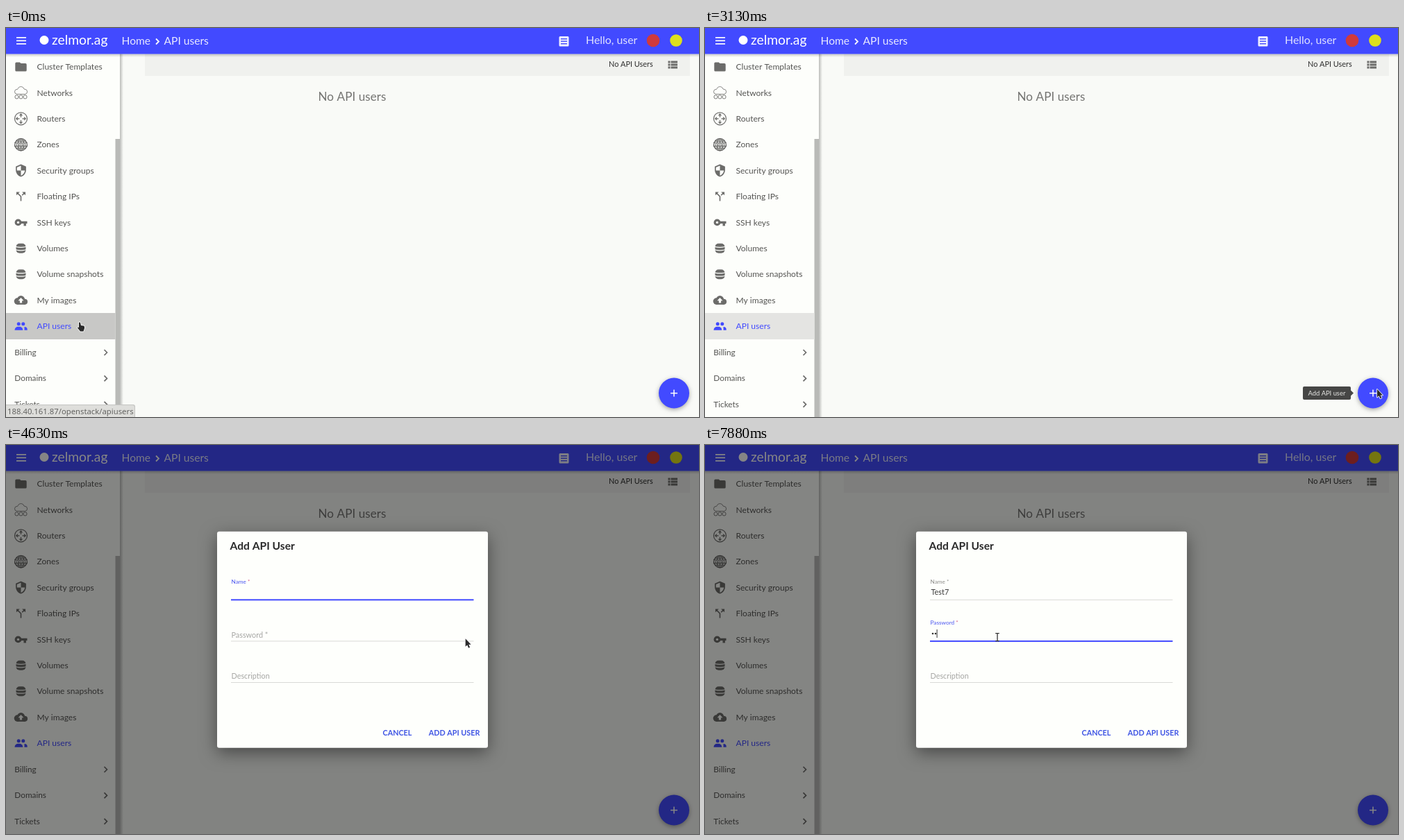
These frames come from a looping animation (998x561 px, 8000 ms). An HTML page with a canvas:

```html
<!DOCTYPE html>
<html lang="en">
<head>
<meta charset="utf-8">
<title>Add API user</title>
<style>
html, body { margin: 0; width: 100%; height: 100%; overflow: hidden; background: #f9faf7; }
canvas { display: block; width: 998px; height: 561px; }
</style>
</head>
<body>
<canvas id="stage" width="998" height="561"></canvas>
<script>
const ctx = document.getElementById('stage').getContext('2d');
const LOOP = 8000, STEP = 125;
const BLUE = '#424aff', PRESSED = '#4047da', ICON = '#6c6c6a', PAPER = '#fdfefb';
const DIALOG_OPEN = 26, FOCUS_NAME = 29, POINTER_LEAVES = 32, FOCUS_PASSWORD = 53;

// ---- helpers ----
function text(str, x, y, size, color, weight = 400, family = 'Lato, sans-serif') {
  ctx.font = `${weight} ${size}px ${family}`;
  ctx.fillStyle = color;
  ctx.fillText(str, x, y);
  return ctx.measureText(str).width;
}
function rect(x, y, w, h, color) {
  ctx.fillStyle = color;
  ctx.fillRect(x, y, w, h);
}
function panel(x, y, w, h, r, color) {
  ctx.fillStyle = color;
  ctx.beginPath();
  ctx.roundRect(x, y, w, h, r);
  ctx.fill();
}
function disc(x, y, r, color) {
  ctx.fillStyle = color;
  ctx.beginPath();
  ctx.arc(x, y, r, 0, 7);
  ctx.fill();
}
function ring(x, y, rx, ry, color, width) {
  ctx.strokeStyle = color;
  ctx.lineWidth = width;
  ctx.beginPath();
  ctx.ellipse(x, y, rx, ry, 0, 0, 7);
  ctx.stroke();
}
function line(points, color, width) {
  ctx.strokeStyle = color;
  ctx.lineWidth = width;
  ctx.beginPath();
  points.forEach(([x, y]) => ctx.lineTo(x, y));
  ctx.stroke();
}
function shadow(color, blur, dy) {
  ctx.shadowColor = color;
  ctx.shadowBlur = blur;
  ctx.shadowOffsetY = dy;
}
function fade(x0, y0, x1, y1, x, y, w, h, alpha) {
  const g = ctx.createLinearGradient(x0, y0, x1, y1);
  g.addColorStop(0, `rgba(0,0,0,${alpha})`);
  g.addColorStop(1, 'rgba(0,0,0,0)');
  rect(x, y, w, h, g);
}
const mix = (a, b, p) => a + (b - a) * p;

// ---- sidebar icons, drawn around 0,0 ----
function glyph(d) {
  const path = new Path2D(d);
  return () => {
    ctx.scale(.82, .82);
    ctx.translate(-12, -12);
    ctx.fillStyle = ICON;
    ctx.fill(path, 'evenodd');
  };
}
const folder = glyph('M10 4H4Q2 4 2 6V18Q2 20 4 20H20Q22 20 22 18V8Q22 6 20 6H12Z');
const shield = glyph('M12 1L3 5V11C3 16.5 6.8 21.7 12 23C17.2 21.7 21 16.5 21 11V5ZM12 12H19C18.5 16 15.7 19.8 12 21V12H5V6.3L12 3.2Z');
const split = glyph('M14 4L16.3 6.3 13.4 9.2 14.8 10.6 17.7 7.7 20 10V4ZM10 4H4V10L6.3 7.7 11 12.4V20H13V11.6L7.7 6.3Z');

function network() {
  ctx.beginPath();
  ctx.arc(-5.5, -1.5, 3.5, 1.6, 4.9);
  ctx.arc(0, -4, 4.8, 3.5, 6);
  ctx.arc(5.5, -1.5, 3.6, 4.7, 7.8);
  ctx.closePath();
  ctx.strokeStyle = '#888886';
  ctx.lineWidth = 1;
  ctx.stroke();
  line([[-6, 6], [6, 6]], '#888886', 1);
  for (const x of [-6, 0, 6]) {
    disc(x, 6, 2.8, PAPER);
    ring(x, 6, 2.6, 2.6, '#777775', 1);
  }
}
function router() {
  ring(0, 0, 9, 9, ICON, 1.2);
  for (let i = 0; i < 4; i++) {
    line([[0, -2], [0, -6.5]], ICON, 1.3);
    line([[-2, -4.5], [0, -6.8], [2, -4.5]], ICON, 1.2);
    ctx.rotate(Math.PI / 2);
  }
}
function globe() {
  ring(0, 0, 8.6, 8.6, ICON, 1.5);
  ring(0, 0, 4.3, 8.6, ICON, 1.3);
  line([[0, -8], [0, 8]], ICON, 1.3);
  line([[-7, -5], [7, -5]], ICON, 1.3);
  line([[-7, 5], [7, 5]], ICON, 1.3);
  rect(-9.5, -3, 19, 6, ICON);
  ctx.textAlign = 'center';
  text('www', 0, 2, 7.5, PAPER, 700);
}
function key() {
  rect(-1, -1.7, 10, 3.4, ICON);
  rect(4, 0, 3.4, 5, ICON);
  disc(-4, 0, 4.9, ICON);
  disc(-4, 0, 1.7, PAPER);
}
function disks() {
  panel(-7, -7, 14, 14, 5, ICON);
  for (const y of [-3.5, 1]) {
    ctx.strokeStyle = PAPER;
    ctx.lineWidth = 1.2;
    ctx.beginPath();
    ctx.ellipse(0, y, 8, 2, 0, 0, Math.PI);
    ctx.stroke();
  }
}
function cloud() {
  disc(-5, 1.5, 4.8, ICON);
  disc(0, -1, 5.6, ICON);
  disc(5.5, 2.2, 4.1, ICON);
  rect(-5, 1, 10.5, 5.3, ICON);
  ctx.fillStyle = PAPER;
  ctx.beginPath();
  [[0, -3.5], [4, .7], [1.6, .7], [1.6, 4], [-1.6, 4], [-1.6, .7], [-4, .7]].forEach(p => ctx.lineTo(...p));
  ctx.fill();
}
function people() {
  for (const x of [-3.3, 3.3]) disc(x, -3.2, 2.5, BLUE);
  panel(5, 1, 4.2, 4.7, [0, 4, 0, 0], BLUE);
  panel(-9, .8, 11.8, 4.9, [5, 5, 0, 0], BLUE);
}
const MENU = [
  ['Cluster Templates', folder], ['Networks', network], ['Routers', router], ['Zones', globe],
  ['Security groups', shield], ['Floating IPs', split], ['SSH keys', key], ['Volumes', disks],
  ['Volume snapshots', disks], ['My images', cloud], ['API users', people]
];

// ---- page ----
function drawHeader() {
  fade(0, 37.5, 0, 42, 0, 37.5, 998, 4.5, .2);
  rect(0, 0, 998, 37.5, BLUE);
  for (const y of [13, 17.5, 22]) rect(15, y, 14, 1.7, '#fff');
  disc(55, 17.5, 6.5, '#fff');
  text('zelmor.ag', 66, 23.5, 19.3, '#fff');
  text('Home', 166.5, 24, 15.6, '#e8e9ff');
  line([[216, 15.5], [220, 19.5], [216, 23.5]], '#fff', 1.8);
  text('API users', 227.5, 24, 15.6, '#e8e9ff');
  panel(796.5, 12, 14, 14.5, 1.5, '#eef');
  for (const y of [15, 18.5, 22]) rect(799, y, 9, 1.4, BLUE);
  text('Hello, user', 835, 23.3, 15.9, '#dfe1ff');
  disc(932, 18, 9.3, '#d03a3c');
  disc(965, 18, 8.8, '#dde01c');
}
function drawSidebar(k) {
  rect(0, 37, 164, 524, PAPER);
  fade(164, 0, 169, 0, 164, 37, 5, 524, .25);
  rect(157.5, 160, 6.5, 401, '#b9bab7');
  if (k < DIALOG_OPEN) {
    const shade = Math.round(mix(200, 228, Math.min(1, Math.max(0, (k - 17) / 3))));
    rect(0, 411, 157.5, 38, `rgb(${shade},${shade},${shade - 2})`);
  }
  MENU.forEach(([label, icon], i) => {
    const y = 56 + i * 37.4;
    ctx.save();
    ctx.translate(21.5, y);
    icon();
    ctx.restore();
    text(label, 44.5, y + 4.2, 12.05, icon === people ? BLUE : '#555553');
  });
  ['Billing', 'Domains', 'Tickets'].forEach((label, i) => {
    const y = 467.5 + i * 37.4;
    text(label, 12.3, y + 4.2, 11.8, '#555553');
    line([[141.5, y - 3.5], [145.5, y + .5], [141.5, y + 4.5]], '#6c6c6a', 1.7);
  });
}
function drawMain() {
  rect(0, 0, 998, 561, '#f9faf7');
  rect(200, 37, 785, 32, '#f0f1ee');
  text('No API Users', 868, 56.3, 10.9, '#2d2d2d');
  for (const y of [47.5, 51.5, 55.5]) {
    rect(953.5, y, 3, 3, ICON);
    rect(957.5, y, 9.5, 3, ICON);
  }
  text('No API users', 449.5, 105.3, 17.2, '#757573');
}
function drawAddButton(k) {
  ctx.save();
  shadow('rgba(0,0,0,.35)', 6, 2);
  disc(962, 526.5, 22, k >= DIALOG_OPEN && k < POINTER_LEAVES ? PRESSED : BLUE);
  ctx.restore();
  rect(957, 525.9, 10, 1.5, '#fff');
  rect(961.25, 521.6, 1.5, 10, '#fff');
}
function drawTooltip() {
  panel(861, 517, 69, 19, 2, '#464645');
  ctx.beginPath();
  [[930, 522.5], [934, 526.5], [930, 530.5]].forEach(p => ctx.lineTo(...p));
  ctx.fill();
  text('Add API user', 868.5, 529.5, 9.4, '#e6e6e4');
}
function drawStatus() {
  panel(-1, 543, 187, 19, [0, 3, 0, 0], '#c4c4c2');
  panel(-1, 544, 186, 18, [0, 3, 0, 0], '#dededb');
  text('188.40.161.87/openstack/apiusers', 2, 556.5, 11.3, '#636361', 400, '"Noto Sans", sans-serif');
}

// ---- dialog ----
function floatAmount(k, start) {
  if (k < start) return 0;
  return 1 - (1 - Math.min(1, ((k - start) * STEP + 22) / 400)) ** 3;
}
function drawField(label, required, y, raised, focused) {
  const labelY = mix(y - 5.2, y - 23.5, raised), size = mix(10.85, 8.25, raised);
  const idle = raised ? '#8d8d8b' : '#a5a5a3';
  const w = text(label, 324.5, labelY, size, focused ? '#4a55f0' : idle);
  if (required) text(' *', 324.5 + w, labelY, size, focused ? '#d0507c' : idle);
  if (focused) rect(324, y - 1, 349.5, 2, BLUE);
  else rect(324, y - .5, 349.5, 1, '#d9d9d6');
}
function caretOn(k, since) {
  return Math.floor((k - since) / 5) % 2 === 0;
}
function drawDialog(k) {
  const p = 1 - .1 ** (k - DIALOG_OPEN + 1);
  const onPassword = k >= FOCUS_PASSWORD, onName = k >= FOCUS_NAME && !onPassword;
  ctx.save();
  ctx.globalAlpha = mix(.3, 1, p);
  ctx.translate(mix(997, 499, p), mix(540, 280.5, p));
  ctx.scale(p, p);
  ctx.translate(-499, -280.5);
  ctx.save();
  shadow('rgba(0,0,0,.45)', 24, 7);
  panel(304, 124.7, 390, 312, 3, '#fefffc');
  ctx.restore();

  text('Add API User', 322.5, 150.7, 15.6, '#2a2a2a', 700);
  drawField('Name', true, 223.3, floatAmount(k, FOCUS_NAME), onName);
  drawField('Password', true, 282.9, floatAmount(k, FOCUS_PASSWORD), onPassword);
  drawField('Description', false, 342.5, 0, false);

  const typed = 'Test7'.slice(0, Math.max(0, k - 38));
  const width = text(typed, 325.5, 216.3, 10.9, '#3a3a3a');
  if (onName) {
    if (typed.length === 5) rect(325.5, 217, width, 1, '#e0686c');
    const lastKey = typed ? Math.min(k, 43) : FOCUS_NAME;
    if (caretOn(k, lastKey)) rect(325.6 + width, 207, 1, 12, '#333');
  }
  if (onPassword) {
    const dots = k >= 62 ? 2 : k >= 60 ? 1 : 0;
    for (let i = 0; i < dots; i++) disc(328 + i * 4, 272, 1.3, '#333');
    if (caretOn(k, dots ? 60 : FOCUS_PASSWORD)) rect(325.6 + dots * 4, 266, 1, 12, '#333');
  }
  text('CANCEL', 542.5, 419.2, 10.8, '#3f55e4', 700);
  text('ADD API USER', 608.8, 419.2, 10.8, '#3f55e4', 700);
  ctx.restore();
}

// ---- pointer: step, x, y ----
const PATH = [
  [10, 105, 424], [11, 160, 426], [12, 330, 434], [14, 676, 458], [15, 790, 476], [17, 903, 506],
  [19, 952, 517], [21, 968, 521], [26, 968, 521], [30, 963, 521], [31, 963, 521], [35, 708, 290],
  [36, 708, 290], [39, 569, 258], [44, 569, 258], [50, 421, 277]
];
function pointerAt(k) {
  const i = PATH.findIndex(point => point[0] >= k);
  if (i <= 0) return PATH[i ? PATH.length - 1 : 0].slice(1);
  const [k0, x0, y0] = PATH[i - 1], [k1, x1, y1] = PATH[i];
  const p = (k - k0) / (k1 - k0);
  return [mix(x0, x1, p), mix(y0, y1, p)];
}
const ARROW = new Path2D('M0 0V11.5L2.6 9.2 4.5 13.3 6.4 12.4 4.6 8.5H8Z');
const HAND = new Path2D('M0 1Q1 -.5 2 1L3 5 7 5.5Q8.5 6 8 9L6.5 13.5H2L-2 8.5Q-2 7 0 8Z');
function drawPointer(k) {
  const [x, y] = pointerAt(k);
  ctx.save();
  ctx.translate(x, y);
  if (k >= 47) {
    rect(-.6, -5.5, 1.3, 11, '#333');
    rect(-2.8, -6, 5.6, 1.2, '#333');
    rect(-2.8, 5, 5.6, 1.2, '#333');
  } else {
    const shape = x < 158 ? HAND : ARROW;
    ctx.lineJoin = 'round';
    ctx.lineWidth = 1.8;
    ctx.strokeStyle = 'rgba(255,255,255,.85)';
    ctx.stroke(shape);
    ctx.fillStyle = '#2b2b2b';
    ctx.fill(shape);
  }
  ctx.restore();
}

function draw(k) {
  drawMain();
  drawSidebar(k);
  drawHeader();
  drawAddButton(k);
  if (k < 16) drawStatus();
  if (k >= 21 && k < DIALOG_OPEN) drawTooltip();
  if (k >= DIALOG_OPEN) {
    rect(0, 0, 998, 561, 'rgba(2,2,0,.48)');
    drawDialog(k);
  }
  drawPointer(k);
}
function tick() {
  draw(Math.floor(performance.now() % LOOP / STEP));
  requestAnimationFrame(tick);
}
tick();
</script>
</body>
</html>
```
